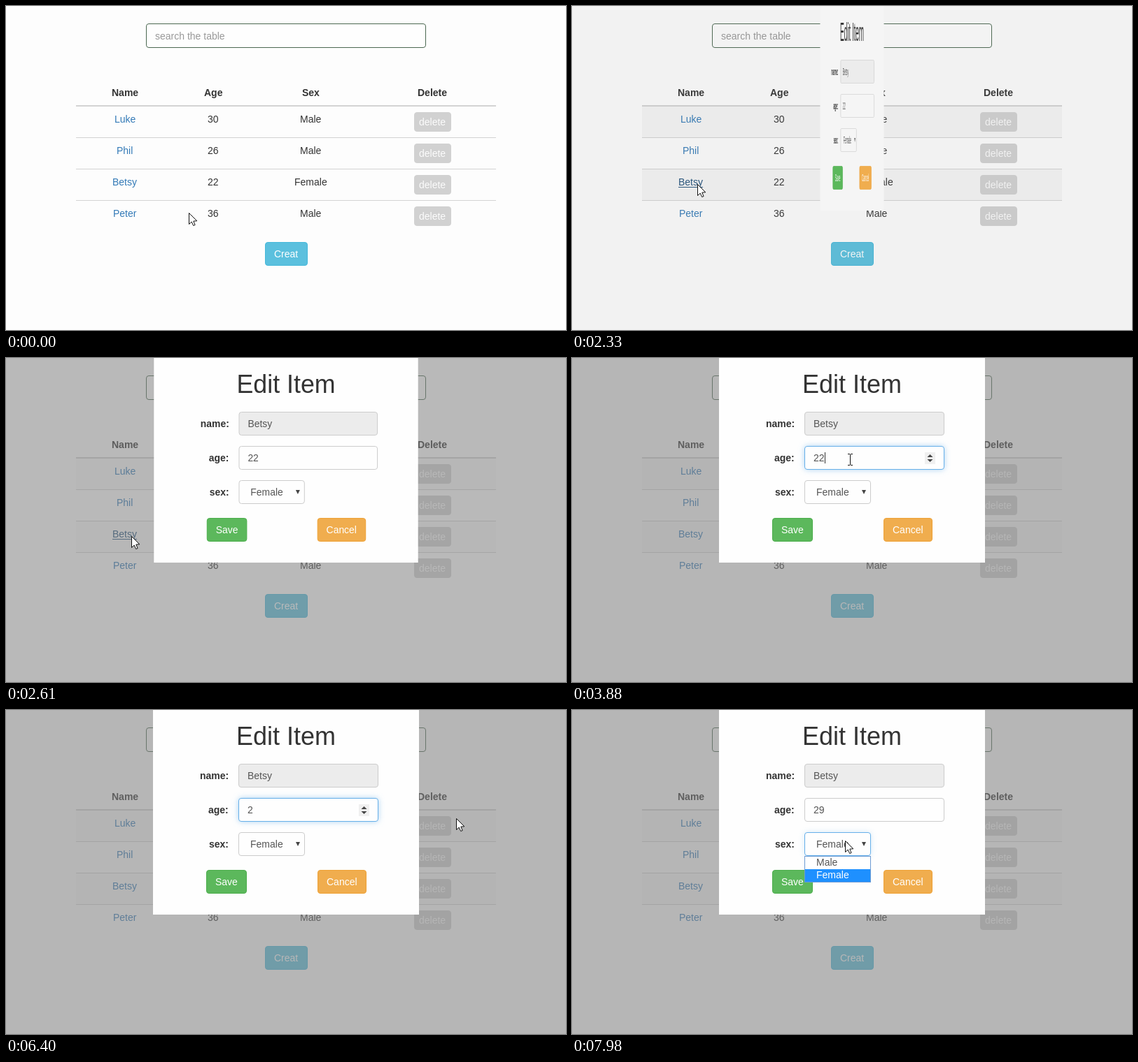
These frames come from a looping animation (800 px wide and 464 px high, 8 s). An HTML page with a canvas:

```html
<!DOCTYPE html>
<html lang="en">
<head>
<meta charset="utf-8">
<title>Editable table</title>
<style>
  html, body { margin: 0; width: 100%; height: 100%; overflow: hidden; background: #fdfdfd; }
  canvas { display: block; width: 800px; height: 464px; }
</style>
</head>
<body>
<canvas id="stage" width="800" height="464"></canvas>
<script>
const ctx = document.getElementById('stage').getContext('2d');
const LOOP = 8000;
const STEP = 135;
const FAMILY = '"Liberation Sans", Arial, sans-serif';

const HOVER = 1360, LEAVE = 3450, FOCUS = 3740, SELECT = 7980;
const OPEN = { first: 2330, lead: 24, duration: 450 };
const EDITED = 2;

const people = [
  ['Luke', '30', 'Male'],
  ['Phil', '26', 'Male'],
  ['Betsy', '22', 'Female'],
  ['Peter', '36', 'Male']
];
const columns = { Name: 170, Age: 296, Sex: 435.5, Delete: 609.5 };
const centers = Object.values(columns);

const home = { x: 261, y: 296 };
const moves = [
  { start: 410, end: 1360, via: { x: 1020, y: 283 }, to: { x: 183, y: 261 } },
  { start: 1510, end: 1780, via: { x: 177, y: 257 }, to: { x: 179, y: 255 } },
  { start: 2900, end: 3740, via: { x: 310, y: 150 }, to: { x: 397, y: 145 } },
  { start: 5110, end: 6000, via: { x: 891, y: 220 }, to: { x: 643, y: 155 } },
  { start: 7200, end: 7710, via: { x: 450, y: 200 }, to: { x: 390, y: 187 } }
];
const edits = [
  { time: 3880, value: '22' },
  { time: 6000, value: '2' },
  { time: 7080, value: '29' }
];

const clamp = v => Math.min(1, Math.max(0, v));
const easeOut = (u, power) => 1 - (1 - u) ** power;
const smooth = u => u * u * (3 - 2 * u);
const bezier = (a, b, c, u) => (1 - u) ** 2 * a + 2 * u * (1 - u) * b + u * u * c;

function pointerAt(t) {
  let at = home;
  for (const { start, end, via, to } of moves) {
    if (t < start) break;
    const intervals = Math.round((end - start) / STEP);
    const done = Math.floor((t - start) / (end - start) * intervals + 1e-6) + 1;
    const u = smooth(clamp(done / (intervals + 1)));
    at = {
      x: Math.round(bezier(at.x, via.x, to.x, u)),
      y: Math.round(bezier(at.y, via.y, to.y, u))
    };
  }
  return at;
}

function dialogAt(t) {
  if (t < OPEN.first) return { scale: 0, shade: 0 };
  const elapsed = Math.floor((t - OPEN.first) / 130) * 130 + OPEN.lead;
  const u = clamp(elapsed / OPEN.duration);
  return { scale: easeOut(u, 5), shade: 0.57 * easeOut(u, 3) };
}

function text(str, x, y, color, { bold = false, size = 14, align = 'left' } = {}) {
  ctx.font = `${bold ? 'bold ' : ''}${size}px ${FAMILY}`;
  ctx.fontKerning = 'none';
  ctx.fillStyle = color;
  const width = ctx.measureText(str).width;
  const left = Math.round(x - width * { left: 0, center: 0.5, right: 1 }[align]);
  ctx.fillText(str, left, y);
  return { left, width: Math.round(width) };
}

function rect(x, y, w, h, color) {
  ctx.fillStyle = color;
  ctx.fillRect(x, y, w, h);
}

function box(x, y, w, h, fill, border, glow = 0) {
  ctx.beginPath();
  ctx.roundRect(x + 0.5, y + 0.5, w - 1, h - 1, 3.5);
  ctx.save();
  if (glow) {
    ctx.shadowColor = `rgba(102,175,233,${0.6 * glow})`;
    ctx.shadowBlur = 8;
  }
  ctx.fillStyle = fill;
  ctx.fill();
  ctx.restore();
  ctx.lineWidth = 1;
  ctx.strokeStyle = glow ? '#66afe9' : border;
  ctx.stroke();
}

function button(label, x, y, w, h, fill, border, color = '#fff') {
  box(x, y, w, h, fill, border);
  text(label, x + w / 2, y + h / 2 + 5, color, { align: 'center' });
}

function polygon(points, color) {
  ctx.beginPath();
  points.forEach(([x, y]) => ctx.lineTo(x, y));
  ctx.closePath();
  ctx.fillStyle = color;
  ctx.fill();
}

function triangle(x, y, half, height) {
  polygon([[x - half, y], [x + half, y], [x, y + height]], '#444');
}

function drawPage(t, scale) {
  rect(0, 0, 800, 464, '#fdfdfd');
  box(200, 25, 400, 35, '#fefefe', '#4b6851');
  text('search the table', 213, 48, '#999');

  for (const head in columns) {
    text(head, columns[head], 129, '#333', { bold: true, align: 'center' });
  }
  people.forEach((row, r) => {
    const top = 144 + r * 45;
    const base = top + 23;
    if (scale && r % 2 === 0) rect(100, top, 600, 44, `rgba(0,0,0,${0.038 - 0.024 * scale})`);
    rect(100, r ? top - 1 : 142, 600, r ? 1 : 2, '#d3d3d3');

    const hovered = r === EDITED && t >= HOVER && t < LEAVE;
    row.forEach((cell, c) => {
      const color = c ? '#333' : hovered ? '#23527c' : '#337ab7';
      const { left, width } = text(cell, centers[c], base, color, { align: 'center' });
      if (hovered && !c) rect(left, base + 2, width, 1, color);
    });
    button('delete', 583, top + 8, 53, 28, '#d1d1d1', '#d1d1d1', '#fcfcfc');
  });
  button('Creat', 370, 338, 61, 34, '#5bc0de', '#46b8da');
}

function drawAge(t, fill, focused) {
  box(332, 126, 200, 34, fill, '#ccc', focused ? clamp((t - FOCUS) / STEP + 0.5) : 0);
  const edit = edits.findLast(e => t >= e.time) || edits[0];
  const { left, width } = text(edit.value, 345, 148, '#555');
  if (!focused) return;
  rect(504, 135, 15, 17, '#f0f0f0');
  triangle(511.5, 142, 4, -4);
  triangle(511.5, 145, 4, 4);
  const blinkOn = Math.floor((t - edit.time) / 400) % 2 === 0;
  if (blinkOn) rect(left + width, 135, 1, 16, '#333');
}

function drawOptions() {
  rect(332, 209, 95, 38, '#6d9bd3');
  rect(333, 210, 93, 18, '#fff');
  rect(333, 228, 93, 18, '#1e90ff');
  text('Male', 349, 223, '#555');
  text('Female', 349, 241, '#fff');
}

function drawDialog(t, scale) {
  const open = t >= SELECT;
  const paper = scale < 0.5 ? '#f5f5f5' : '#fefefe';
  ctx.save();
  ctx.translate(400 * (1 - scale), 0);
  ctx.scale(scale, 1);
  rect(210, 0, 380, 293, paper);
  text('Edit Item', 400, 50, '#333', { size: 36, align: 'center' });
  ['name:', 'age:', 'sex:'].forEach((label, i) =>
    text(label, 318, 99 + i * 49, '#333', { bold: true, align: 'right' }));

  box(332, 77, 200, 34, '#ececec', '#ccc');
  text(people[EDITED][0], 345, 99, '#555');
  drawAge(t, paper, t >= FOCUS && !open);
  box(332, 175, 95, 34, paper, '#ccc', open ? 0.5 : 0);
  text('Female', 349, 197, '#555');
  triangle(417, 189, 3, 6);

  button('Save', 286, 229, 58, 34, '#5cb85c', '#4cae4c');
  button('Cancel', 445, 229, 70, 34, '#f0ad4e', '#eea236');
  if (open) drawOptions();
  ctx.restore();
}

function drawBeam({ x, y }) {
  rect(x, y - 7, 1, 15, '#111');
  for (const end of [y - 8, y + 8]) {
    rect(x - 3, end, 3, 1, '#111');
    rect(x + 1, end, 3, 1, '#111');
  }
}

function drawArrow({ x, y }) {
  ctx.save();
  ctx.translate(x + 0.5, y + 0.5);
  polygon([[0, 0], [0, 16], [3.7, 12.6], [6.2, 18], [8.6, 17], [6.3, 11.6], [11.3, 11.3]], '#fff');
  ctx.lineWidth = 1;
  ctx.strokeStyle = '#111';
  ctx.stroke();
  ctx.restore();
}

function drawPointer(t) {
  const at = pointerAt(t);
  const overAge = t >= LEAVE && at.x > 332 && at.x < 500 && at.y > 126 && at.y < 160;
  (overAge ? drawBeam : drawArrow)(at);
}

function render(t) {
  const { scale, shade } = dialogAt(t);
  drawPage(t, scale);
  if (scale) {
    rect(0, 0, 800, 464, `rgba(128,128,128,${shade})`);
    drawDialog(t, scale);
  }
  drawPointer(t);
}

const start = performance.now();
function tick() {
  render((performance.now() - start) % LOOP);
  requestAnimationFrame(tick);
}
tick();
</script>
</body>
</html>
```
